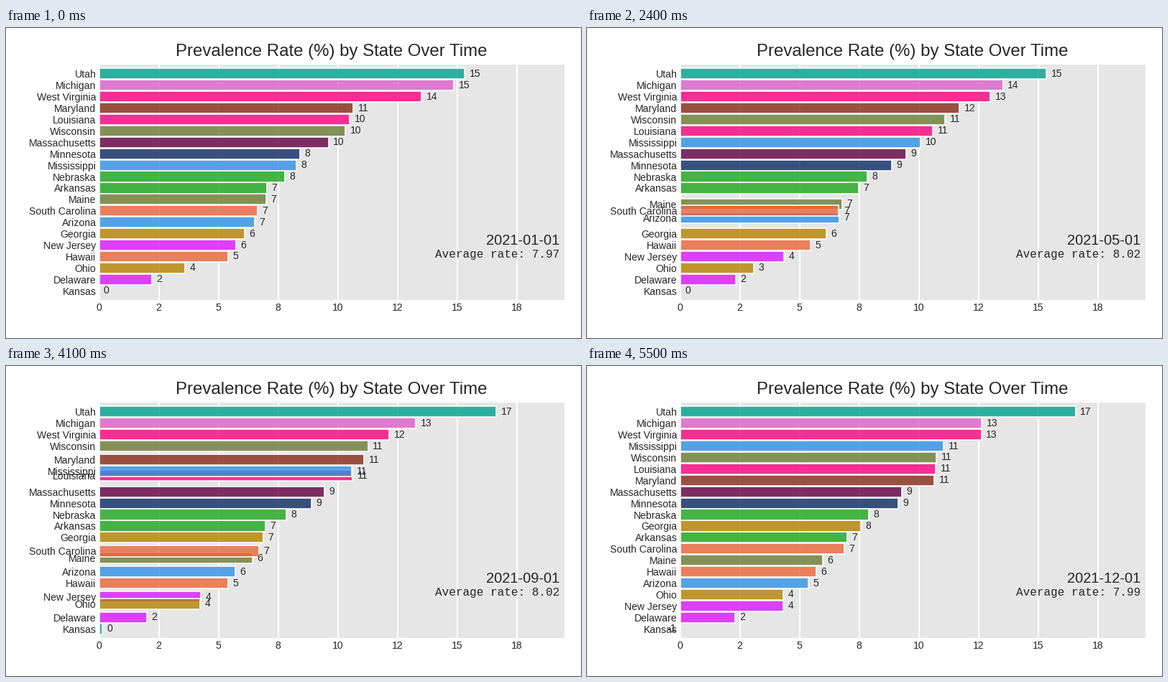
A matplotlib script that plays this animation: 800x432 px, repeating every 5550 ms.

```python
import matplotlib.pyplot as plt
import numpy as np
from matplotlib.animation import FuncAnimation

DPI = 100
STEPS = 10          # frames per month
MONTHS = 12
X_MAX = 19.485
INK = "0.15"

PALETTE = ["#2E91E5", "#1CA71C", "#DA16FF", "#B68100", "#EB663B", "#00A08B",
           "#FC0080", "#6C7C32", "#862A16", "#620042", "#DA60CA", "#0D2A63"]

# Rates at the months in KNOTS; the months between lie on straight lines.
KNOTS = [0, 3, 5, 7, 8, 10, 11]
RATES = {
    "Arizona": [6.52, 7.04, 6.61, 5.94, 5.76, 4.97, 5.37],
    "Arkansas": [7.03, 7.17, 7.51, 6.94, 6.91, 7.44, 7.00],
    "Delaware": [2.21, 2.33, 2.33, 1.73, 2.01, 1.90, 2.30],
    "Georgia": [6.09, 6.09, 6.13, 6.36, 6.84, 7.18, 7.57],
    "Hawaii": [5.40, 5.22, 5.49, 5.19, 5.39, 5.54, 5.70],
    "Kansas": [0.00, -0.22, 0.03, -0.05, 0.19, -0.32, -0.75],
    "Louisiana": [10.49, 10.58, 10.58, 10.04, 10.56, 11.05, 10.70],
    "Maine": [7.00, 6.55, 6.81, 6.49, 6.39, 6.43, 5.97],
    "Maryland": [10.64, 11.89, 11.67, 11.39, 11.18, 10.31, 10.64],
    "Massachusetts": [9.61, 9.70, 9.44, 9.16, 9.42, 9.54, 9.28],
    "Michigan": [14.85, 13.97, 13.47, 13.35, 13.29, 12.46, 12.63],
    "Minnesota": [8.41, 8.69, 8.88, 8.56, 8.84, 9.33, 9.13],
    "Mississippi": [8.26, 9.25, 10.16, 10.43, 10.58, 10.61, 11.03],
    "Nebraska": [7.78, 7.26, 7.90, 8.14, 7.89, 7.40, 7.90],
    "New Jersey": [5.73, 4.69, 4.31, 4.02, 4.30, 4.00, 4.31],
    "Ohio": [3.60, 3.02, 3.09, 3.75, 4.25, 3.99, 4.32],
    "South Carolina": [6.64, 6.91, 6.62, 6.27, 6.73, 6.69, 6.88],
    "Utah": [15.30, 15.60, 15.30, 16.27, 16.63, 16.63, 16.56],
    "West Virginia": [13.51, 13.32, 12.95, 12.41, 12.10, 12.47, 12.61],
    "Wisconsin": [10.31, 10.89, 11.11, 11.27, 11.28, 11.13, 10.73],
}
# Single months that leave the straight line.
BUMPS = {
    1: {"South Carolina": 6.88},
    6: {"Wisconsin": 11.57},
    9: {"Michigan": 13.14, "West Virginia": 12.32, "South Carolina": 6.55,
        "Maine": 6.57, "Arizona": 5.49, "Hawaii": 5.45,
        "New Jersey": 4.11, "Ohio": 4.14},
}

names = list(RATES)
n = len(names)
months = np.arange(MONTHS)
values = np.array([np.interp(months, KNOTS, r) for r in RATES.values()]).T
for month, bumps in BUMPS.items():
    for name, rate in bumps.items():
        values[month, names.index(name)] = rate
ranks = values.argsort(axis=1).argsort(axis=1) + 1.0


def px(size):
    """Pixels to points."""
    return size * 72 / DPI


def blend(table, t):
    lo = int(t)
    hi = min(lo + 1, MONTHS - 1)
    return table[lo] + (table[hi] - table[lo]) * (t - lo)


plt.rcParams.update({
    "font.family": "Liberation Sans", "text.color": INK,
    "xtick.color": INK, "ytick.color": INK,
})

fig = plt.figure(figsize=(8, 4.32), dpi=DPI, facecolor="white")
ax = fig.add_axes([129.5 / 800, 53 / 432, 647.5 / 800, 328 / 432], facecolor="0.9")
ax.set(xlim=(0, X_MAX), ylim=(0.2, n + 0.8), xticks=np.arange(0, 18, 2.5))
ax.xaxis.set_major_formatter("{x:,.0f}")
ax.tick_params(labelsize=px(14), length=0, pad=px(4))
ax.set_axisbelow(True)
ax.grid(axis="x", color="white", lw=px(2), ls="-")
ax.spines[:].set_visible(False)
ax.set_title("Prevalence Rate (%) by State Over Time", size=px(24), pad=px(12))

bars = ax.barh(ranks[0], values[0], height=0.95, alpha=0.8, ec="white", lw=px(2),
               color=[PALETTE[i % len(PALETTE)] for i in range(n)])
ax.set(xlim=(0, X_MAX), ylim=(0.2, n + 0.8))
labels = [ax.text(0, 0, "", size=px(14), va="center", zorder=10) for _ in names]
date = ax.text(0.99, 0.25, "", size=px(20), ha="right", va="center",
               transform=ax.transAxes)
average = ax.text(0.99, 0.18, "", size=px(16), ha="right",
                  family="Liberation Mono", transform=ax.transAxes)


def draw(frame):
    t = frame / STEPS
    rates, rows = blend(values, t), blend(ranks, t)
    for bar, label, rate, row in zip(bars, labels, rates, rows):
        bar.set_width(rate)
        bar.set_y(row - bar.get_height() / 2)
        label.set_position((rate + 0.01 * X_MAX, row))
        label.set_text(f"{rate:,.0f}")
    ax.set_yticks(rows, names)
    date.set_text(f"2021-{frame // STEPS + 1:02d}-01")
    average.set_text(f"Average rate: {rates.mean():.2f}")
    return [*bars, *labels, date, average]


anim = FuncAnimation(fig, draw, frames=(MONTHS - 1) * STEPS + 1, interval=50,
                     init_func=lambda: draw(0), repeat=True, repeat_delay=0)
plt.show()
```
